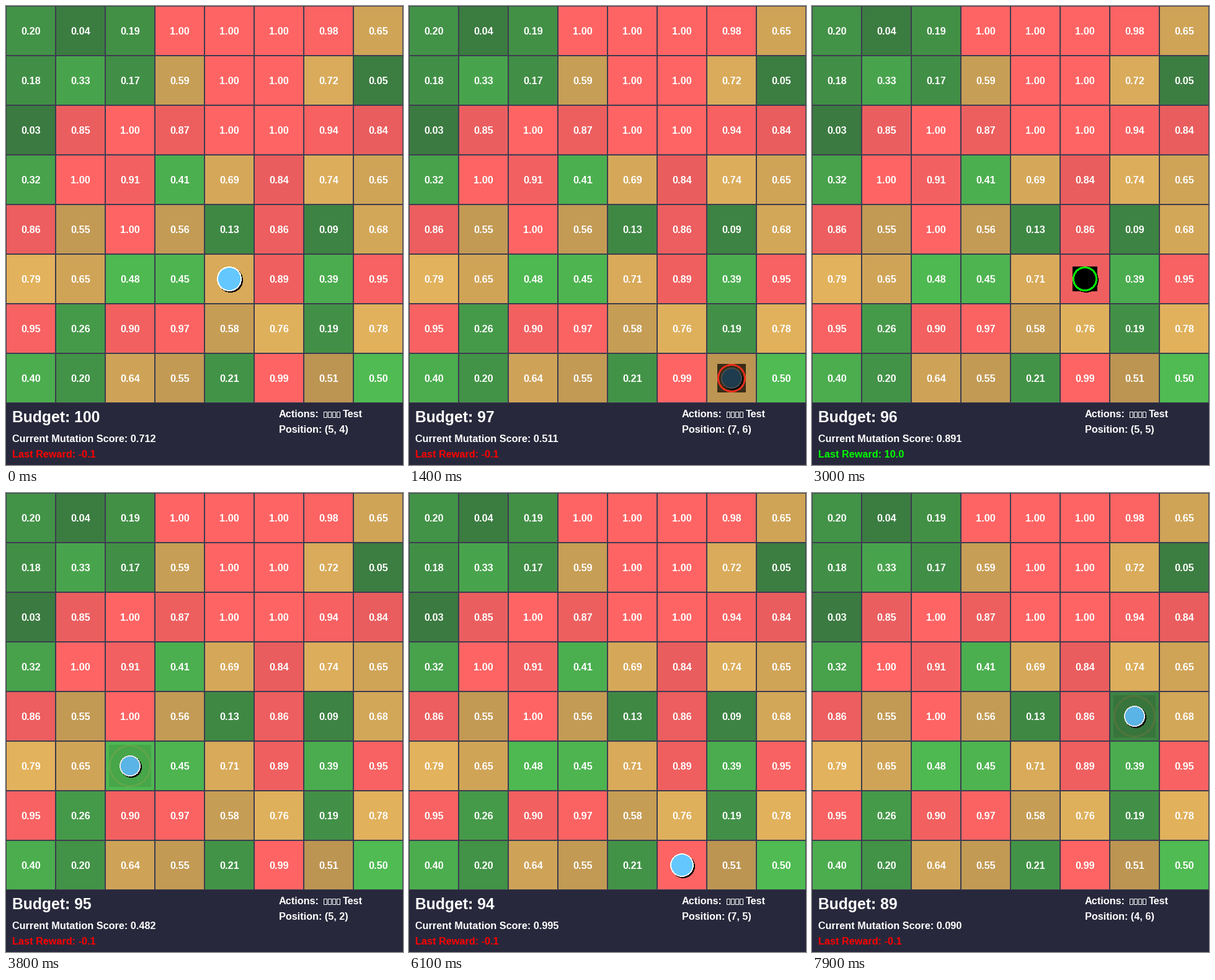
Recreate the animation shown at these times as a matplotlib script. Size 640 px wide and 740 px high, loop 8000 ms.

```python
import numpy as np
import matplotlib.pyplot as plt
from matplotlib.animation import FuncAnimation
from matplotlib.patches import Rectangle

W, H, CELL, N = 640, 740, 80, 8
DPI = 100
FRAMES, STEP_MS = 80, 100

SCORES = np.array([  # thousandths
    [201, 42, 190, 1000, 1000, 1000, 981, 652],
    [181, 331, 172, 590, 1000, 1000, 722, 51],
    [31, 851, 1000, 872, 1000, 1000, 941, 842],
    [321, 1000, 911, 412, 691, 843, 741, 652],
    [861, 551, 1000, 562, 131, 862, 90, 681],
    [791, 653, 482, 453, 712, 891, 392, 951],
    [952, 261, 902, 971, 582, 763, 192, 781],
    [401, 202, 643, 552, 211, 995, 511, 502],
]) / 1000

PANEL = (40, 40, 60)
BACK = np.array((30, 30, 40))
LINE = (60, 60, 80)
LOW, MID, HIGH = (100, 255, 100), (255, 200, 100), (255, 100, 100)
AGENT, WHITE, BLACK = (100, 200, 255), (255, 255, 255), (0, 0, 0)
RED, GREEN = (255, 0, 0), (0, 255, 0)

MOVES = {"U": (-1, 0), "D": (1, 0), "L": (0, -1), "R": (0, 1)}
ACTIONS = ("LURTDDRUTRDDTD" "RRDLULURRULLUDDT" "DLULTDLULDDRDTRD"
           "URUULDRRDRDDULD" "UTLURUUDT" "RTRTRTLUD")


def cell_color(s):
    top = LOW if s < 0.505 else MID if s < 0.8 else HIGH
    a = (100 + 155 * s) / 255
    return BACK + a * (np.array(top) - BACK)


def simulate():
    """State per step: row, col, budget, reward, effect age, effect color."""
    row, col, budget, reward, age, tint = 5, 4, 100, -0.1, 99, RED
    states = [(row, col, budget, reward, age, tint)]
    for act in ACTIONS:
        age += 1
        if act == "T":
            hit = SCORES[row, col] >= 0.8
            budget, age = budget - 1, 0
            reward, tint = (10.0, GREEN) if hit else (-5.0, RED)
        else:
            dr, dc = MOVES[act]
            row = min(max(row + dr, 0), N - 1)
            col = min(max(col + dc, 0), N - 1)
            reward = -0.1
        states.append((row, col, budget, reward, age, tint))
    return states


def make_board():
    img = np.empty((H, W, 3))
    img[:] = PANEL
    for r in range(N):
        for c in range(N):
            box = img[r * CELL:(r + 1) * CELL, c * CELL:(c + 1) * CELL]
            box[:] = LINE
            box[1:-1, 1:-1] = cell_color(SCORES[r, c])
    return img


STATES = simulate()
BOARD = make_board()
AXIS = np.arange(CELL) + 0.5 - CELL / 2
X, Y = np.meshgrid(AXIS, AXIS)
DIST = np.hypot(X, Y)


def paint_agent(tile, k, age, tint):
    r = int(20 + 3 * np.sin(0.3 * (k + 1)))
    tile[np.hypot(X - 2, Y - 2) < r] = BLACK
    tile[DIST < r] = WHITE
    tile[DIST < r - 2] = AGENT
    if age > 3:
        return
    # fading square overlay with a growing ring
    alpha = 1 - 0.3 * age
    size = r + int(5.7 * age + 0.4)
    box = np.maximum(abs(X), abs(Y)) < size
    ring = (DIST < size) & (DIST >= size - 3)
    layer = np.zeros_like(tile)
    layer[ring] = tint
    tile[box] = (1 - alpha) * tile[box] + alpha * layer[box]


fig = plt.figure(figsize=(W / DPI, H / DPI), dpi=DPI)
ax = fig.add_axes([0, 0, 1, 1])
stage = ax.imshow(BOARD.astype(np.uint8), extent=(0, W, H, 0),
                  aspect="auto", interpolation="nearest")
ax.set_xlim(0, W)
ax.set_ylim(H, 0)
ax.axis("off")


def label(x, y, text="", px=16.3, ha="left"):
    return ax.text(x, y, text, color="white", ha=ha, va="baseline",
                   family="Liberation Sans", weight="bold",
                   fontsize=px * 72 / DPI)


values = [[label((c + 0.5) * CELL, r * CELL + 46, f"{SCORES[r, c]:.2f}",
                 ha="center") for c in range(N)] for r in range(N)]
budget_text = label(10, 671, px=24.7)
score_text = label(10, 703)
reward_text = label(10, 728)
position_text = label(440, 688)
label(440, 663, "Actions:")
label(543, 663, "Test")
for i in range(4):
    ax.add_patch(Rectangle((511.5 + 7 * i, 653.5), 5, 9, fill=False,
                           ec="white", lw=72 / DPI))


def update(k):
    row, col, budget, reward, age, tint = STATES[k]
    img = BOARD.copy()
    paint_agent(img[row * CELL:(row + 1) * CELL, col * CELL:(col + 1) * CELL],
                k, age, tint)
    stage.set_data(img.round().astype(np.uint8))
    for r in range(N):
        for c in range(N):
            values[r][c].set_visible((r, c) != (row, col))
    budget_text.set_text(f"Budget: {budget}")
    score_text.set_text(f"Current Mutation Score: {SCORES[row, col]:.3f}")
    reward_text.set_text(f"Last Reward: {reward:.1f}")
    reward_text.set_color("#00ff00" if reward > 0 else "#ff0000")
    position_text.set_text(f"Position: ({row}, {col})")
    return []


anim = FuncAnimation(fig, update, frames=FRAMES, interval=STEP_MS,
                     repeat=True, repeat_delay=0, blit=False)
plt.show()
```
